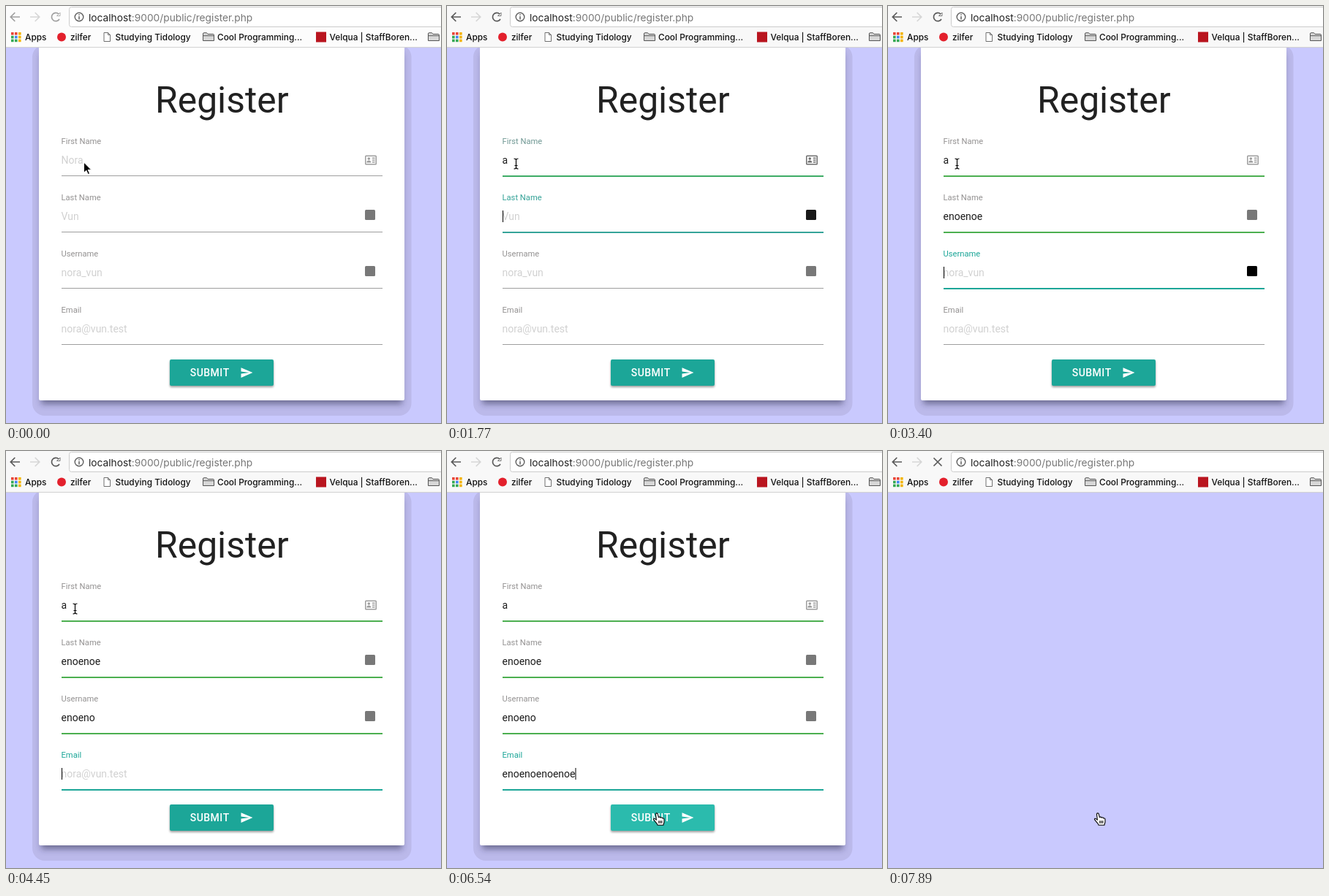
Animation, 595 px wide and 571 px high, one loop 8 s. Source, as an HTML page:

```html
<!DOCTYPE html>
<html lang="en">
<head>
<meta charset="utf-8">
<title>Register form</title>
<style>
  html, body { margin: 0; width: 100%; height: 100%; overflow: hidden; background: #c9c9fe; }
  svg { display: block; width: 595px; height: 571px; }
  text { white-space: pre; }
  .form text { font-family: Roboto, sans-serif; }
  .bar text { font: 500 11.85px Inter, sans-serif; fill: #111; }
  .bar .url { font: 400 13.75px Inter, sans-serif; fill: #777; }
  .label { font-size: 11.2px; }
  .value { font-size: 14px; }
</style>
</head>
<body>
<svg id="stage" viewBox="0 0 595 571" xmlns="http://www.w3.org/2000/svg">
  <defs>
    <filter id="soft" x="-10%" y="-10%" width="120%" height="120%"><feGaussianBlur stdDeviation="4"/></filter>
    <filter id="lift" x="-10%" y="-20%" width="120%" height="150%"><feGaussianBlur stdDeviation="1.4"/></filter>
    <clipPath id="buttonClip"><rect x="224" y="484" width="142" height="36" rx="2"/></clipPath>
  </defs>
  <rect width="595" height="571" fill="#c9c9fe"/>

  <g class="form" id="form">
    <rect x="36" y="53" width="518.5" height="508" rx="17" fill="#bbb9ea"/>
    <rect x="48" y="66" width="494" height="479" fill="#24223f" opacity=".5" filter="url(#soft)"/>
    <rect x="45" y="50" width="500" height="490" rx="2" fill="#fff"/>
    <text x="295.3" y="146" font-size="49.84" fill="#212121" text-anchor="middle">Register</text>
    <g id="fields"></g>
    <rect x="224" y="486" width="142" height="36" rx="2" opacity=".38" filter="url(#lift)"/>
    <rect id="button" x="224" y="484" width="142" height="36" rx="2"/>
    <circle id="ripple" cx="289" cy="502" fill="#fff" opacity=".4" clip-path="url(#buttonClip)"/>
    <text x="251.7" y="507" font-size="14" font-weight="500" letter-spacing=".5" fill="#fff">SUBMIT</text>
    <path transform="translate(320 493) scale(.758)" fill="#fff" d="M2 21L23 12 2 3V10L17 12 2 14Z"/>
  </g>

  <g class="bar">
    <rect id="toolbar" width="595" height="57"/>
    <path d="M0 56.5H595" stroke="#d2d2d2"/>
    <rect x="86.5" y="1.5" width="530" height="27" rx="3" fill="#fff" stroke="#cbcbcb"/>
    <g fill="none" stroke-width="1.7">
      <g id="nav">
        <path d="M19 15H6.5M12.3 9L6.3 15L12.3 21"/>
        <g id="reload">
          <path d="M73 18A5.7 5.7 0 1 1 72.2 11"/>
          <path d="M74 9V13.5H69.5Z" stroke-width=".8"/>
        </g>
        <path id="stop" d="M62.5 9.5L73.5 20.5M73.5 9.5L62.5 20.5"/>
      </g>
      <path d="M33 15H45.5M39.7 9L45.7 15L39.7 21" stroke="#d6d6d6"/>
      <circle cx="100" cy="15" r="5.8" stroke="#5f5f5f" stroke-width="1.4"/>
      <path d="M100 14V18.5M100 11.3V12.8" stroke="#5f5f5f" stroke-width="1.5"/>
    </g>
    <text class="url" x="113" y="20.5"><tspan fill="#222">localhost</tspan>:9000/public/register.php</text>
    <g id="apps"></g>
    <text x="26" y="47">Apps</text>
    <circle cx="76" cy="42.5" r="6" fill="#e3202c"/>
    <text x="88" y="47">zilfer</text>
    <path d="M134 36.5H139.5L142.5 39.5V48.5H134ZM139.5 36.5V39.5H142.5" fill="#fff" stroke="#707070"/>
    <text x="149.5" y="47">Studying Tidology</text>
    <g id="folders"></g>
    <text x="289" y="47">Cool Programming...</text>
    <rect x="424" y="35.5" width="14" height="14" fill="#b9151f"/>
    <text x="442.5" y="47">Velqua | StaffBoren...</text>
  </g>

  <g id="cursor" stroke-linejoin="round">
    <path id="arrow" d="M0 0V14.2L3.4 11.2L5.7 16.5L8 15.5L5.7 10.3H10.2Z" stroke="#fff"/>
    <g id="beam" fill="none">
      <path d="M-3 -7Q0 -7 0 -5Q0 -7 3 -7M0 -5V5M-3 7Q0 7 0 5Q0 7 3 7M-2 2.5H2" stroke="#fff" stroke-width="3"/>
      <path d="M-3 -7Q0 -7 0 -5Q0 -7 3 -7M0 -5V5M-3 7Q0 7 0 5Q0 7 3 7M-2 2.5H2" stroke="#000" stroke-width="1.2"/>
    </g>
    <g id="hand" stroke="#000" stroke-width="1.1">
      <path fill="#fff" d="M-3.5 1.2C-3.5 -.8 -1 -.8 -.7 1L.4 5.5C1.2 4.4 2.8 4.8 3 6C4 5 5.4 5.6 5.6 6.8C6.6 6.2 8 6.8 8 8.2V11.5C8 13.5 7 14 7 16H-1C-1 14.5 -3 13 -4 11.5L-6.3 8.6C-7 7.2 -5.4 6.4 -4.2 7.6L-2.6 9Z"/>
      <path fill="none" d="M.8 10V13.5M2.8 10V13.5M4.8 10V13.5"/>
    </g>
  </g>
</svg>
<script>
const LOOP = 8000, ACTIVATE = 740, HOVER = 6390, SEND = 7290, LEAVE = 7890, STEP = 140;
const TEAL = [28, 166, 152], GREEN = [76, 175, 80], GREY = [158, 158, 158];
const LABEL = [148, 146, 146], DARK = [120, 120, 120], BLACK = [0, 0, 0];
const $ = id => document.getElementById(id);
const show = (el, on) => el.setAttribute('visibility', on ? 'inherit' : 'hidden');
const mix = (a, b, k) => `rgb(${a.map((v, i) => Math.round(v + (b[i] - v) * k))})`;
// Last entry whose time has come
const at = (steps, t) => steps.reduce((found, s) => s[0] <= t ? s : found, steps[0]);

// typed: [time, letters shown]
const fields = [
  { label: 'First Name', hint: 'Nora', text: 'a', focus: ACTIVATE, blur: 1770,
    typed: [[0, 0], [1330, 1]], card: true },
  { label: 'Last Name', hint: 'Vun', text: 'enoenoe', focus: 1770, blur: 3250,
    typed: [[0, 0], [2370, 2], [2520, 4], [2670, 5], [2810, 7]], icon: true },
  { label: 'Username', hint: 'nora_vun', text: 'enoeno', focus: 3250, blur: 4300,
    typed: [[0, 0], [3550, 1], [3700, 3], [4000, 6]], icon: true },
  { label: 'Email', hint: 'nora@vun.test', text: 'enoenoenoenoe', focus: 4300, blur: SEND,
    typed: [[0, 0], [4600, 1], [4750, 3], [4900, 5], [5050, 7], [5200, 9], [5350, 11], [5500, 13]],
    frozen: true }
];

// [time, x, y, shape]
const moves = [
  [0, 106.5, 214, 'arrow'], [150, 109, 215, 'arrow'], [300, 110, 216, 'arrow'],
  [590, 102, 216, 'beam'], [740, 94.5, 216, 'beam'],
  [5800, 110, 240, 'arrow'], [5950, 160, 312, 'arrow'], [6100, 215, 392, 'arrow'],
  [6240, 256, 455, 'beam'], [HOVER, 282, 491, 'hand'], [6540, 289, 496.2, 'hand']
];
const ripples = [[0, 0], [6840, 22], [6990, 48], [7140, 72], [SEND, 100]];

$('apps').innerHTML = ['#e94435', '#e94435', '#f4b400', '#34a853', '#4285f4', '#f4b400', '#34a853', '#34a853', '#f4b400']
  .map((c, i) => `<rect x="${7 + i % 3 * 5}" y="${36 + Math.floor(i / 3) * 4.8}" width="3.6" height="3.6" fill="${c}"/>`).join('');
$('folders').innerHTML = [269, 577].map(x =>
  `<path transform="translate(${x} 36)" d="M.5 11.5V2Q.5 .7 1.8 .7H5.5L7 2.5H14.2Q15.5 2.5 15.5 3.8V11.5ZM.5 4.7H15.5" fill="#d8d8d8" stroke="#555"/>`).join('');

const idCard = `<path fill-rule="evenodd" d="M492.500 204.500H505.500Q507 204.500 507 206V216Q507 217.500 505.500 217.500H492.500Q491 217.500 491 216V206Q491 204.500 492.500 204.500ZM492.500 206V216H505.500V206Z"/>
  <circle cx="496.3" cy="209" r="1.8"/>
  <path d="M493.300 214.500Q493.300 211.500 496.300 211.500T499.300 214.500ZM500.800 207.500H504.500V209H500.800ZM500.800 210.300H504.500V211.700H500.800ZM500.800 213H504.500V214.500H500.800Z"/>`;

$('fields').innerHTML = fields.map((f, i) => `<g transform="translate(0 ${i * 77})">
  <text class="label" x="75.5" y="189">${f.label}</text>
  <text class="value hint" x="75.5" y="216" fill="#d1d1d1">${f.hint}</text>
  <text class="value typed" x="75.5" y="216" fill="#1c1c1c"></text>
  <rect class="caret" y="203" width="1" height="16"/>
  <rect class="line" x="76" y="232" width="439"/>
  <g class="icon">${f.card ? idCard : f.icon ? '<rect x="491" y="202" width="14" height="14" rx="1.5"/>' : ''}</g>
</g>`).join('');
fields.forEach((f, i) => {
  for (const name of ['label', 'hint', 'typed', 'caret', 'line', 'icon'])
    f[name + 'El'] = $('fields').children[i].querySelector('.' + name);
});

function drawField(f, t) {
  const active = t >= f.focus && t < f.blur, left = t >= f.blur;
  const settled = left ? !f.frozen && t >= f.blur + STEP : t >= f.focus + STEP;
  const glow = active ? (settled ? 1 : .8) : left && !settled ? .3 : 0;
  const text = f.text.slice(0, at(f.typed, t)[1]);

  if (f.typedEl.textContent !== text) f.typedEl.textContent = text;
  show(f.hintEl, !text);
  show(f.caretEl, active);
  f.caretEl.setAttribute('x', text ? 75.5 + f.typedEl.getComputedTextLength() : 76);
  f.labelEl.setAttribute('fill', mix(LABEL, TEAL, glow));
  f.lineEl.setAttribute('fill', mix(left ? GREEN : GREY, TEAL, glow));
  f.lineEl.setAttribute('height', active || left ? 2 : 1);
  f.iconEl.setAttribute('fill', mix(f.card ? GREY : DARK, BLACK, glow));
}

function draw(t) {
  const awake = t >= ACTIVATE;
  $('toolbar').setAttribute('fill', awake ? '#f8f8f8' : '#fcfcfc');
  $('nav').setAttribute('stroke', awake ? '#5a5a5a' : '#a0a0a0');
  show($('reload'), t < SEND);
  show($('stop'), t >= SEND);

  show($('form'), t < LEAVE);
  fields.forEach(f => drawField(f, t));
  $('button').setAttribute('fill', t >= HOVER ? '#2bbbad' : `rgb(${TEAL})`);
  $('ripple').setAttribute('r', at(ripples, t)[1]);

  const [, x, y, shape] = at(moves, t);
  $('cursor').setAttribute('transform', `translate(${x} ${y})`);
  for (const id of ['arrow', 'beam', 'hand']) show($(id), id === shape);
}

let start;
function tick(now) {
  start ??= now;
  draw((now - start) % LOOP);
  requestAnimationFrame(tick);
}
draw(0);
requestAnimationFrame(tick);
</script>
</body>
</html>
```
